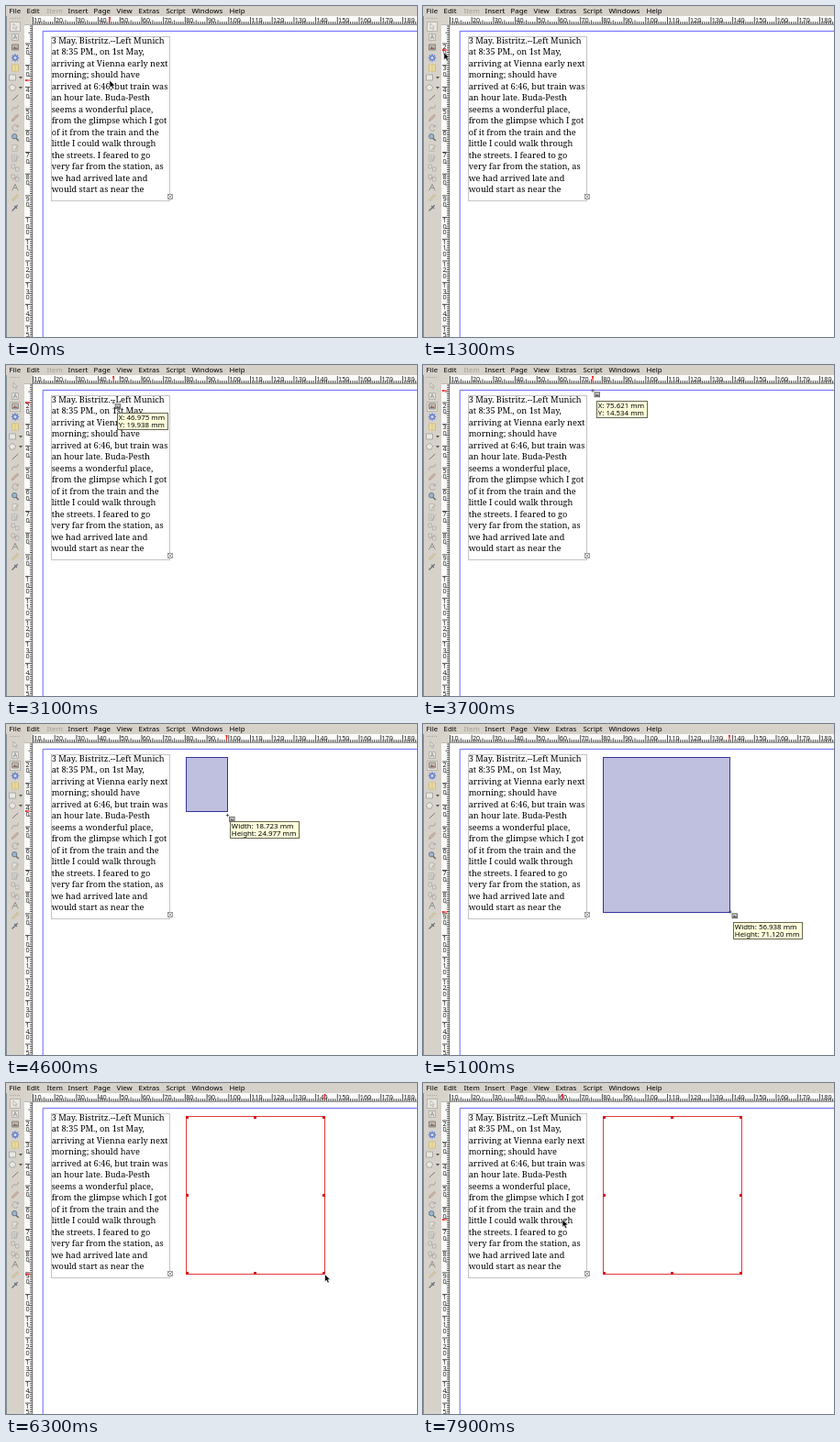
An HTML page that plays this animation: 448 by 361 pixels, repeating every 8000 ms.

```html
<!DOCTYPE html>
<html lang="en">
<head>
<meta charset="utf-8">
<title>Drawing an image frame</title>
<style>
html, body { margin: 0; width: 100%; height: 100%; overflow: hidden; background: #fff; }
svg { display: block; width: 448px; height: 361px; }
text { white-space: pre; }
.ui { font-family: "Noto Sans", sans-serif; font-size: 7.9px; }
.ruler { font-family: "Noto Sans", sans-serif; font-size: 7.2px; fill: #222; }
.story { font-family: "Noto Serif", serif; font-size: 9.2px; fill: #000; }
.crisp { shape-rendering: crispEdges; }
</style>
</head>
<body>
<svg id="stage" viewBox="0 0 448 361"></svg>
<script>
const LOOP = 8000, MM = 2.37, X0 = 5.8, Y0 = -6.4;
const FRAME = { x: 196.5, y: 36.5 };
const stage = document.getElementById("stage");

function add(parent, tag, attrs = {}, text) {
  const el = document.createElementNS("http://www.w3.org/2000/svg", tag);
  for (const k in attrs) el.setAttribute(k, attrs[k]);
  if (text !== undefined) el.textContent = text;
  parent.appendChild(el);
  return el;
}
const set = (el, attrs) => { for (const k in attrs) el.setAttribute(k, attrs[k]); };
const show = (el, on) => el.setAttribute("visibility", on ? "visible" : "hidden");
const rect = (p, x, y, width, height, fill, more) =>
  add(p, "rect", { x, y, width, height, fill, ...more });
const path = (p, d, stroke, more) => add(p, "path", { d, stroke, fill: "none", ...more });

// Page
rect(stage, 0, 0, 448, 361, "#fff");
path(stage, "M40.2 361V27.4H448", "#6464f8");

// Text frame
const story = [
  "3 May. Bistritz.--Left Munich", "at 8:35 PM., on 1st May,", "arriving at Vienna early next",
  "morning; should have", "arrived at 6:46, but train was", "an hour late. Buda-Pesth",
  "seems a wonderful place,", "from the glimpse which I got", "of it from the train and the",
  "little I could walk through", "the streets. I feared to go", "very far from the station, as",
  "we had arrived late and", "would start as near the"
];
rect(stage, 49.5, 33.5, 129, 179, "none", { stroke: "#c4c4c4", class: "crisp" });
story.forEach((s, i) => add(stage, "text", { x: 49.7, y: 41 + i * 12.48, class: "story" }, s));
rect(stage, 176.5, 205.5, 5, 5, "#fff", { stroke: "#888", "stroke-width": 0.8 });
path(stage, "M177 206l4 4m0-4l-4 4", "#777", { "stroke-width": 0.7 });

// New frame: rubber band, then selected frame with handles
const band = rect(stage, FRAME.x, FRAME.y, 0, 0, "#bfbfdf", { stroke: "#3434a0", class: "crisp" });
const picked = add(stage, "g", { class: "crisp" });
rect(picked, FRAME.x, FRAME.y, 151, 172, "none", { stroke: "#e03a3a" });
for (const x of [197, 271.5, 346.5])
  for (const y of [37, 122, 207.5])
    if (x !== 271.5 || y !== 122) rect(picked, x - 1.5, y - 1.5, 3, 3, "#d81818");

// Rulers
rect(stage, 20, 11, 428, 9.5, "#fbfbfa");
rect(stage, 20, 11, 9, 350, "#fbfbfa");
let ticksX = "", ticksY = "";
const tickLen = mm => mm % 10 === 0 ? 8 : mm % 5 === 0 ? 4.5 : 3;
for (let mm = 10; mm <= 187; mm++) {
  const x = X0 + mm * MM, y = Y0 + mm * MM;
  if (x > 29) ticksX += `M${x.toFixed(1)} 20v${-tickLen(mm)}`;
  if (y > 20 && y < 361) ticksY += `M29 ${y.toFixed(1)}h${-tickLen(mm)}`;
  if (mm % 10) continue;
  add(stage, "text", { x: x + 0.8, y: 17.8, class: "ruler" }, mm);
  if (mm > 10) [...String(mm)].forEach((c, i) =>
    add(stage, "text", { x: 21.5, y: y + 5.6 + i * 6.5, class: "ruler" }, c));
}
path(stage, ticksX, "#222", { "stroke-width": 0.8 });
path(stage, ticksY, "#222", { "stroke-width": 0.8 });
path(stage, "M20 20.2H448M28.7 20V361", "#444", { "stroke-width": 0.7 });
const markX = path(stage, "M0 20L-1 12H1Z", "none", { fill: "#f01818" });
const markY = path(stage, "M28.5 0L21 -1V1Z", "none", { fill: "#f01818" });
rect(stage, 20, 11, 9, 9.5, "#d8d4cc");

// Menu bar and toolbar
rect(stage, 0, 0, 448, 11, "#d6d2ca");
rect(stage, 0, 11, 20, 350, "#d6d2ca");
rect(stage, 0, 11, 1, 350, "#7f8f94");
path(stage, "M4 13.5H16", "#aaa69e", { "stroke-dasharray": "1 1", class: "crisp" });
const menu = { File: 4, Edit: 23, Item: 45, Insert: 68, Page: 96, View: 121, Extras: 145, Script: 175, Windows: 203, Help: 244 };
const items = {};
for (const name in menu)
  items[name] = add(stage, "text", { x: menu[name] - 0.5, y: 8.3, class: "ui", fill: "#000" }, name);

const active = rect(stage, 4.5, 17.5, 11, 10, "#e9e6e1", { stroke: "#b8b4ac", class: "crisp" });
const bright = add(stage, "g", { opacity: 0.8 }), pale = add(stage, "g", { opacity: 0.5 });
const icon = (g, y, d, stroke, fill = "none", more) =>
  path(g, d, stroke, { fill, transform: `translate(10 ${y})`, "stroke-width": 0.9, ...more });
const box = "M-3.5 -3.5H3.5V3.5H-3.5Z";
icon(pale, 22.5, "M-2 -3.5V2.5L-.5 1.2L.7 3.6L1.6 3.2L.6 .9H2.3Z", "#888", "#f4f4f4");
icon(pale, 34, box, "#888", "#fafafa");
icon(pale, 34, "M-2 2.3L0 -2.5L2 2.3M-1.2 .8H1.2", "#555");
icon(bright, 45, "M-3.5 -3H3.5V3H-3.5Z", "#666", "#b9b4aa");
icon(bright, 45, "M-2.5 2L-.8 -1L1 1L2 0L2.8 2Z", "none", "#7a4c38");
icon(bright, 56.5, "M0 -4.2V4.2M-4.2 0H4.2M-3 -3L3 3M3 -3L-3 3", "#4a6cd0", "none", { "stroke-width": 1.3 });
add(bright, "circle", { cx: 10, cy: 56.5, r: 2.2, fill: "#d6e0f8", stroke: "#4a6cd0", "stroke-width": 1.3 });
icon(bright, 67.5, box, "#cdb45c", "#f8ecb0");
icon(bright, 67.5, "M-3.5 -1.2H3.5M-3.5 1.2H3.5M0 -3.5V3.5", "#cdb45c", "none", { "stroke-width": 0.6 });
icon(pale, 78, "M-6.5 -3H.5V3H-6.5Z", "#777", "#fff");
icon(pale, 89, "M-3 -3.6L.6 -1L-.8 3H-5.2L-6.6 -1Z", "#777", "#fff");
for (const y of [78, 89]) icon(bright, y, "M4 -1H8L6 1.4Z", "none", "#333");
icon(bright, 100, "M-3.2 3L3.2 -3", "#555");
icon(pale, 111, "M-3.5 3.5C-3 -4 3 4 3.4 -3.2", "#666");
icon(pale, 122, "M-3.5 3.5L-2.7 1L2.4 -3.6L3.6 -2.4L-1.2 2.6Z", "#7b5b4c", "#d0a080");
icon(pale, 133, "M3 -1.8A3.3 3.3 0 1 0 3 1.8M3.4 -3.4V-1.2H1.2", "#777");
icon(bright, 143, "M1 1.2L3.8 4", "#555", "none", { "stroke-width": 1.6 });
add(bright, "circle", { cx: 9.2, cy: 142.2, r: 2.7, fill: "#8fb0d8", stroke: "#456", "stroke-width": 0.9 });
icon(pale, 155, "M-3 -3.5H2V3.5H-3Z", "#999", "#eee");
icon(pale, 155, "M-1 2.5L3.6 -2.6", "#a99b7a", "none", { "stroke-width": 1.4 });
icon(pale, 166, "M-3.6 -3.5H1.6V3.5H-3.6Z", "#999", "#eee");
icon(pale, 166, "M-2.6 -1.6H.6M-2.6 .2H.6M-2.6 2H.6M0 3L3.8 -2.5", "#666", "none", { "stroke-width": 0.7 });
for (const y of [176.5, 187.5])
  icon(pale, y, "M-4 -3.5H-.6V.5H-4ZM.6 -.5H4V3.5H.6Z", "#888", "#e4e4e4");
icon(pale, 187.5, "M-3 3L3 -3", "#866");
icon(bright, 198, "M-3.4 3.4L0 -3.6L3.2 3.4M-1.6 .4H1.8", "#777");
icon(pale, 209, "M-3.4 2.4L2.4 -3.4L3.6 -2.2L-2.2 3.6Z", "#a88c50", "#e8d890");
icon(bright, 220, "M-3.5 3.5L1 -1M-.8 -2L2 .8M1 -1L2.8 -2.8", "#4c5566", "none", { "stroke-width": 1.2 });

// Tooltip
const tip = add(stage, "g");
const tipBox = rect(tip, 0.5, 0.5, 56, 18, "#ffffdc", { stroke: "#66664e", class: "crisp" });
const tipA = add(tip, "text", { x: 1.8, y: 8.1, class: "ui", fill: "#000" });
const tipB = add(tip, "text", { x: 1.8, y: 16.2, class: "ui", fill: "#000" });

// Pointers
const arrow = path(stage, "M0 0V8.2L1.9 6.5L3.2 9.4L4.8 8.7L3.5 5.9H6Z", "#fff",
  { fill: "#000", "stroke-width": 0.6 });
const placer = add(stage, "g");
path(placer, "M-1.8 0H1.8M0 -1.8V1.8", "#333", { "stroke-width": 0.7 });
rect(placer, 2, 1.8, 5.6, 5, "#c4c4c4", { stroke: "#555", "stroke-width": 0.8 });
path(placer, "M2.8 6L4.2 3.6L5.4 5L6.2 4.2L7 6Z", "none", { fill: "#555" });

// time, pointer x, y, tooltip values in mm
const keys = [
  [0, 113, 81, 0, 0], [400, 113, 81, 0, 0], [700, 52, 61, 0, 0], [800, 52, 61, 0, 0],
  [1200, 27, 48, 0, 0], [1700, 6, 61, 0, 0], [2300, 7, 45, 0, 0], [2500, 7, 45, 0, 0],
  [2600, 19, 34, 5.6, 17], [3400, 176, 45, 71.8, 21.7], [3500, 176, 45, 71.8, 21.7],
  [3700, 185, 28, 75.621, 14.534], [4000, 196, 36, 80.264, 17.892], [4300, 196, 36, 80.264, 17.892],
  [4300, 196, 36, 0, 0], [4600, 240.5, 95, 18.723, 24.977], [5100, 334, 205, 56.938, 71.12],
  [5200, 344, 214, 62.442, 75.142], [5600, 347.5, 208.5, 63.712, 72.602],
  [6700, 347.5, 208.5, 63.712, 72.602], [7600, 151, 149, 0, 0], [7900, 152, 149, 0, 0]
];
function sample(t) {
  const i = Math.max(1, keys.findIndex(k => t <= k[0]));
  const a = keys[i - 1], b = keys[i], u = (t - a[0]) / (b[0] - a[0]);
  return a.slice(1).map((v, n) => v + (b[n + 1] - v) * u);
}

function draw(time) {
  const t = Math.floor((time % LOOP) / 100) * 100;
  const [x, y, a, b] = sample(t);
  const tool = t >= 2300 && t < 6300;
  const placing = t >= 2700 && t < 6300;
  const drag = t >= 4400 && t < 6300;
  const done = t >= 6300;

  // Ruler marks rest while the pointer is over the toolbar
  const [mx, my] = t > 1200 && t < 2700 ? sample(1200) : [x, y];
  set(markX, { transform: `translate(${mx} 0)` });
  set(markY, { transform: `translate(0 ${my})` });

  set(active, { y: tool ? 40.5 : 17.5 });
  set(items.Item, { fill: done ? "#000" : "#a09c94" });
  show(band, drag);
  show(picked, done);
  if (drag) set(band, { width: Math.round(x - 196), height: Math.round(y - 36) });

  show(tip, placing);
  if (placing) {
    set(tip, { transform: `translate(${Math.round(x + 3.5)} ${Math.round(y + 11)})` });
    set(tipBox, { width: drag ? 75 : 55 });
    tipA.textContent = `${drag ? "Width" : "X"}: ${a.toFixed(3)} mm`;
    tipB.textContent = `${drag ? "Height" : "Y"}: ${b.toFixed(3)} mm`;
  }

  const lag = drag && t < 5000 ? 4.5 : 0;
  show(arrow, !placing);
  show(placer, placing);
  set(placing ? placer : arrow, { transform: `translate(${x + (drag ? 1 : 0)} ${y + lag})` });
}

const start = performance.now();
(function tick() {
  draw(performance.now() - start);
  requestAnimationFrame(tick);
})();
</script>
</body>
</html>
```
